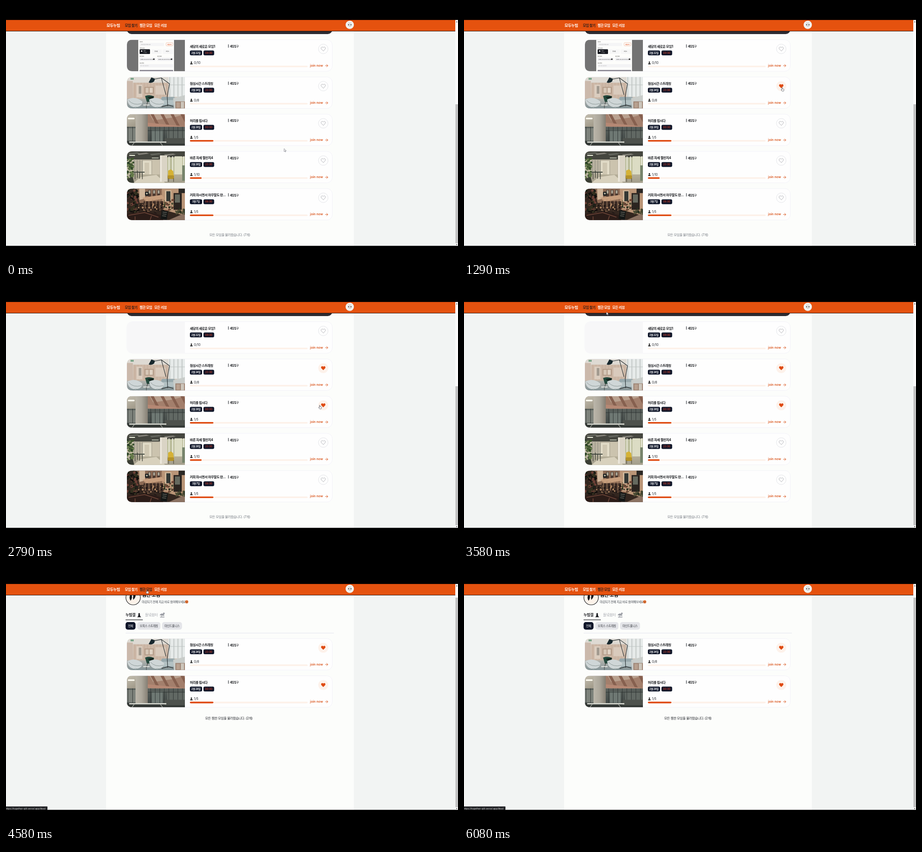
These frames come from a looping animation (998x561 px, 6.75 s). An HTML page:

```html
<!DOCTYPE html>
<html lang="ko">
<head>
<meta charset="utf-8">
<style>
html, body { margin: 0; width: 100%; height: 100%; overflow: hidden; background: #000; }
svg { display: block; width: 100%; height: 100%; }
text { font-family: Inter, "Noto Sans CJK KR", "Noto Sans CJK", sans-serif; white-space: pre; }
.like .full, .like.on .empty { display: none; }
.like.on .full { display: inline; }
</style>
</head>
<body>
<svg id="stage" viewBox="0 0 998 561"></svg>
<script>
const LOOP = 6750;
const ORANGE = '#df4b12', NAVY = '#0f1629';

const rect = (x, y, w, h, fill, r = 0, extra = '') =>
  `<rect x="${x}" y="${y}" width="${w}" height="${h}" rx="${r}" fill="${fill}" ${extra}/>`;
const circle = (x, y, r, fill, extra = '') =>
  `<circle cx="${x}" cy="${y}" r="${r}" fill="${fill}" ${extra}/>`;
const shape = (d, fill) => `<path d="${d}" fill="${fill}"/>`;
const line = (d, stroke, w = 1) =>
  `<path d="${d}" fill="none" stroke="${stroke}" stroke-width="${w}" stroke-linecap="round" stroke-linejoin="round"/>`;
// Hangul is set a little tighter than Latin text.
const text = (x, y, s, size, fill, weight = 400, anchor = 'start', extra = '') => {
  const spacing = /[가-힣]/.test(s) ? -size * 0.05 : 0;
  return `<text x="${x}" y="${y}" font-size="${size}" fill="${fill}" font-weight="${weight}"
    text-anchor="${anchor}" letter-spacing="${spacing}" ${extra}>${s}</text>`;
};
const group = (x, y, content, extra = '') => `<g transform="translate(${x} ${y})" ${extra}>${content}</g>`;
const gradient = (id, x2, y2, ...colors) => `<linearGradient id="${id}" x2="${x2}" y2="${y2}">` +
  colors.map((c, i) => `<stop offset="${i / (colors.length - 1)}" stop-color="${c}"/>`).join('') + '</linearGradient>';

let seed = 7;
const random = () => (seed = seed * 16807 % 2147483647) / 2147483647;
const speckle = (n, x, y, w, h, colors, r) => Array.from({ length: n }, () =>
  circle((x + random() * w).toFixed(1), (y + random() * h).toFixed(1), (r * (0.5 + random())).toFixed(1),
    colors[Math.floor(random() * colors.length)])).join('');
const bars = (from, to, step, y, h, fill, w = 0.7) => {
  let out = '';
  for (let x = from; x <= to; x += step) out += rect(x, y, w, h, fill);
  return out;
};

// Card pictures, each 128 by 70.
const pictures = {
  form: () => rect(0, 0, 128, 70, '#737373') + rect(25, 0, 79, 70, '#fdfdfb') +
    text(28, 5, '이미지', 2.6, '#333') +
    rect(28, 7, 54, 7, '#f5f5f6', 1) + text(31, 11, '이미지를 첨부해주세요', 2.4, '#999') +
    rect(86.5, 6.5, 15, 7, '#fff', 1.5, 'stroke="#e9a27e" stroke-width=".6"') +
    text(94, 11, '파일 찾기', 2.6, ORANGE, 600, 'middle') +
    text(28, 19.5, '선택 서비스', 2.6, '#333') +
    rect(28, 21, 23, 10.5, '#17191f', 1.5) + circle(32.5, 25, 1.5, '#fff') +
    text(36, 25.5, '오피스', 2.4, '#fff') + text(36, 29, '스트레칭', 2.2, '#bbb') +
    rect(54, 21, 23, 10.5, '#f7f7f7', 1.5) + text(61, 26, '들녘쉼', 2.8, '#333') +
    rect(79, 21, 23, 10.5, '#f7f7f7', 1.5) + text(86, 26, '마인드', 2.8, '#333') +
    text(28, 37, '모임 날짜', 2.6, '#333') + text(67, 37, '마감 날짜', 2.6, '#333') +
    [28, 67].map(x => rect(x, 39.5, 35, 7.5, '#f3f3f5', 1) +
      text(x + 2, 44.6, '2025-02-22 07:00 AM', 2.7, '#222') +
      rect(x + 30, 41.6, 3, 3, '#333', 0.4)).join('') +
    text(28, 52, '모집 정원', 2.6, '#333') + rect(28, 54, 74, 7, '#f3f3f5', 1) +
    text(30, 58.5, '최소 5인 이상 입력', 2.4, '#aaa') + rect(28, 66.8, 74, 4, '#898791', 1),

  lounge: () => rect(0, 0, 128, 70, 'url(#plaster)') + shape('M0 0H100L92 12H14L0 7Z', '#dedad3') +
    rect(0, 9, 13, 40, '#cbb9ab') + rect(14, 13, 78, 35, '#cdb8a7') + bars(17, 90, 7, 13, 35, '#bfa794') +
    rect(21, 17, 13, 28, '#dbcdbf') + rect(26, 20, 6, 17, '#a39b90') + rect(39, 22, 20, 15, '#b39b88') +
    rect(41, 24, 7, 11, '#d5c6b6') + rect(50, 24, 7, 11, '#e0d3c4') + rect(63, 19, 22, 20, '#d9cabc') +
    rect(92, 0, 36, 44, '#e6eae9') + bars(94, 127, 9, 0, 44, '#b2b8b7', 1.3) + rect(92, 17, 36, 1, '#bcc2c1') +
    shape('M8 2H15V6H8Z', '#78a287') +
    rect(0, 48, 128, 22, 'url(#carpet)') +
    rect(76, 44, 30, 19, '#97a8ac', 3) + rect(79, 51, 27, 10, '#b3c1c3', 2) +
    shape('M102 47L128 40V70H104Z', '#c9cdca') + rect(107, 54, 21, 16, '#9d8373') +
    rect(109, 56, 8, 12, '#b7a08f') + rect(119, 55, 7, 14, '#ccc5bb') +
    shape('M40 42Q50 38 60 43L57 55H44Z', '#24493d') + shape('M45 45L59 42L57 51Z', '#15241f') +
    line('M46 54L43 64M56 54L60 64', '#332f2c') +
    [[18, 57], [66, 57]].map(([x, y]) => shape(`M${x - 17} ${y - 7}Q${x} ${y - 16} ${x + 16} ${y - 3}Q${x + 16} ${y + 9} ${x} ${y + 10}Q${x - 15} ${y + 9} ${x - 17} ${y - 7}`, '#cfd6d7') +
      line(`M${x - 14} ${y - 5}Q${x - 4} ${y + 7} ${x + 14} ${y + 2}M${x} ${y + 9}L${x - 5} 70M${x + 2} ${y + 9}L${x + 9} 70`, '#7d8987', 0.8)).join('') +
    rect(36, 61, 14, 2, '#e8e8e3') + line('M43 63V70', '#434644') +
    shape('M54 1L62 4L60 10Q53 15 48 12Z', '#17272d') +
    line('M60 5L76 2L94 15L89 43L90 64M76 2L86 39', '#20282b', 1.1) + line('M77 66L91 62L102 65', '#24292a', 1.3),

  beams: () => rect(0, 0, 128, 70, '#8f8878') + shape('M0 0H48L60 28H0Z', 'url(#soffit)') +
    shape('M44 0H128V34L46 24Z', '#a37f6c') + shape('M50 0H128L104 7L58 14Z', '#b9a18f') +
    [52, 74, 96, 118].map(x => shape(`M${x} 0H${x + 7}L${x + 23} 30L${x + 17} 31Z`, '#86604f')).join('') +
    shape('M46 19L128 27V35L46 27Z', '#b58874') + rect(0, 28, 128, 36, 'url(#glass)') +
    rect(0, 31, 20, 28, '#7d827b') + rect(55, 35, 24, 25, '#6e7873') + rect(89, 36, 39, 21, '#616863') +
    bars(2, 128, 10, 28, 36, '#2e3433', 0.9) + rect(45, 36, 83, 0.9, '#2a302f') +
    rect(19, 0, 27, 64, 'url(#column)') +
    rect(2, 8, 15, 3.5, '#fbf9ef', 1.7) + rect(0, 61, 128, 9, '#343936') + rect(83, 53, 45, 12, '#4d514c') +
    rect(5, 60.5, 82, 2.6, '#dddfd6') + line('M16 63L11 70M74 63L79 70', '#b3b6ae', 1.2),

  hall: () => rect(0, 0, 128, 70, '#c7bfa9') + shape('M0 0H128V11L91 18H20L0 17Z', '#45463f') +
    [3, 23, 51, 82].map((x, i) => shape(`M${x} ${4 + i}L${x + 20} ${2 + i}L${x + 26} ${4 + i}L${x + 3} ${7 + i}Z`, i % 2 ? '#85837a' : '#666860')).join('') +
    rect(5, 8, 13, 2, '#f9ffe8', 1) + rect(55, 14, 15, 1.2, '#f9ffe8') +
    rect(14, 18, 60, 34, '#b9b2a0') + rect(34, 21, 20, 30, '#e2dcc8') + rect(39, 25, 10, 26, '#cfc7b2') +
    rect(56, 20, 16, 33, '#cbc3ae') + bars(16, 34, 6, 19, 32, '#85857a', 0.8) +
    rect(89, 13, 39, 47, '#bdbf9f') + bars(92, 127, 8, 11, 48, '#eeeddf', 2) + rect(105, 11, 17, 49, '#dcdcc4') +
    rect(0, 51, 128, 19, 'url(#tiles)') + shape('M30 57L65 52L85 70H14Z', '#d8d1bd') +
    rect(73, 9, 16, 58, '#dad4c5') + rect(73, 9, 4, 58, '#ebe6da') +
    speckle(75, 0, 15, 14, 44, ['#263d25', '#40562f', '#667b4a'], 2) +
    rect(14, 45, 25, 2, '#41483f') + line('M18 48V61M34 48V61M23 43V58M28 47V60', '#3a3c35', 1.3) +
    shape('M0 60L13 57L16 70H0Z', '#3b3f34') +
    shape('M91 43Q97 37 102 44L104 58H91Z', '#d5b235') + rect(90, 53, 14, 8, '#b3922a', 2) +
    line('M92 60V67M103 60V67', '#3e392b') + rect(122, 31, 6, 34, '#77846c'),

  cafe: () => rect(0, 0, 128, 70, '#33261f') + shape('M20 0H78V29L28 32Z', '#8d6b55') +
    shape('M77 0H128V60L78 46Z', '#ba9577') + shape('M27 0H40V22L28 25Z', '#cfb59a') +
    [47, 57, 67].map(x => rect(x, 3, 6, 15, '#4a382f') + rect(x + 1, 4, 4, 7, '#aaa493')).join('') +
    rect(84, 4, 14, 25, '#d2b99b') + rect(87, 6, 9, 22, '#343834') + rect(103, 10, 18, 37, '#2b2420') +
    rect(106, 13, 11, 18, '#66695f') + rect(114, 0, 14, 10, '#2a2724') +
    shape('M34 20L77 14L83 22L43 29Z', '#c79e7d') + rect(37, 28, 43, 18, '#3d2c25') +
    bars(40, 80, 8, 24, 20, '#b08a68', 1.2) + rect(40, 7, 8, 9, '#171c1e', 2) + circle(44, 11, 2, '#b9b19d') +
    speckle(85, 0, 2, 24, 53, ['#120f0d', '#1d2018', '#33301f', '#6d4036'], 2.3) +
    speckle(35, 80, 25, 24, 25, ['#20291a', '#46492f', '#6d4636'], 1.6) +
    speckle(70, 22, 34, 60, 22, ['#17110f', '#5d4536', '#a9805f', '#271d19'], 1.6) +
    shape('M0 56L42 50L80 60V70H0Z', '#2b1c18') + line('M4 59L39 53L69 63M18 62V70M54 61L51 70', '#71483a', 1.6) +
    shape('M77 48L91 50L88 69L74 67Z', '#141716') + line('M79 52L88 53M79 56L87 57M78 60L86 61', '#a6a598', 0.8) +
    shape('M91 70L128 54V70Z', '#8b7262') + speckle(25, 106, 44, 22, 13, ['#29301f', '#4c4c34'], 1.8)
};

const HEART = 'M0 4.5L-4 .5C-6.2-2-3.5-5.4-1-3.9Q-.3-3.4 0-2.8Q.3-3.4 1-3.9C3.5-5.4 6.2-2 4 .5Z';
const person = circle(142.3, 49.5, 1.5, '#111') + shape('M139.5 54.2Q139.7 51.5 142.3 51.5Q145 51.5 145.2 54.2Z', '#111');

function card(top, picture, title, date, time, joined, limit, name) {
  const likeButton =
    `<g class="empty">${circle(0, 0, 10.6, '#fefefe', 'stroke="#dcdde3" stroke-width=".8"')}${line(HEART, '#9c9da4', 0.8)}</g>` +
    `<g class="full">${circle(0, 0, 11, '#fdf2eb')}${shape(HEART, ORANGE)}</g>`;
  return group(267, top,
    rect(0, 0, 453.5, 69.6, '#fefefe', 12, 'stroke="#eeedf6" stroke-width=".7"') +
    `<g clip-path="url(#photo)">${rect(0, 0, 128, 70, '#f7f7f8')}<g class="photo-${name}">${pictures[picture]()}</g></g>` +
    text(139, 17.1, title, 7.2, '#17191d', 700) + rect(223.5, 10.3, 1.2, 7.2, '#30343b') +
    text(227.3, 16.6, '새담입구', 5.5, '#16181c', 600) +
    rect(139, 23.8, 27, 10.8, NAVY, 3) + text(152.4, 31.2, date, 5.5, '#fff', 700, 'middle') +
    rect(169, 23.8, 23.6, 10.8, NAVY, 3) + text(180.8, 31.2, time, 5.5, '#cf3b25', 500, 'middle') +
    person + text(148, 53.9, `${joined}/${limit}`, 7.1, '#202329') +
    rect(139, 57.2, 260, 3.6, '#fdf1e9', 1.8) + (joined ? rect(139, 57.2, 260 * joined / limit, 3.6, ORANGE, 1.8) : '') +
    text(404.3, 59.2, 'join now', 7.1, '#d9541b', 600) +
    line('M438.2 57.3H443.5M440.9 54.5L443.7 57.3L440.9 60.1', '#d9541b', 0.9) +
    group(433.5, 20.3, likeButton, `class="like" id="like-${name}"`));
}

const stretch = ['lounge', '점심시간 스트레칭', '2월 24일', '23:00', 0, 8];
const back = ['beams', '허리를 핍시다', '2월 28일', '00:00', 1, 5];

const searchPage =
  rect(267, 40, 453.5, 22, '#2c2b31', 10) +
  card(74.5, 'form', '새담의 새로운 모임1', '2월 22일', '09:00', 0, 10, 'new') +
  card(156.7, ...stretch, 'stretch') + card(238.8, ...back, 'back') +
  card(321, 'hall', '바른 자세 챌린지4', '2월 28일', '23:00', 1, 10, 'posture') +
  card(403.2, 'cafe', '커피 마시면서 아무말도 안...', '3월 7일', '06:00', 1, 5, 'coffee') +
  text(494, 507.6, '모든 모임을 불러왔습니다. (7개)', 7.2, '#747980', 400, 'middle') +
  rect(992.3, 217, 5.7, 307, '#c1c1c1');

const pill = (x, w, label, fill, color) =>
  rect(x, 115, w, 16.7, fill, 5) + text(x + w / 2, 125.6, label, 6.4, color, 500, 'middle');
const likedPage =
  circle(280.7, 61, 16, '#fcf2e9', 'stroke="#17191f" stroke-width="1.2"') +
  shape('M275 68Q270 60 276 52Q281 60 275 68M281 66Q279 55 285 49Q289 59 281 66', '#17191f') +
  text(300, 59.4, '찜한 모임', 11, '#17191d', 700) +
  text(300, 72.8, '마감되기 전에 지금 바로 참여해보세요', 6.5, '#3f444d') +
  circle(399, 70.3, 3.5, '#ee7936') + line('M396.8 69L398.2 69.6M401.2 69L399.8 69.6M397.7 72.1H400.3', '#5e2818', 0.8) +
  text(264, 102.4, '누빔결', 8.3, '#17191d', 700) +
  circle(294, 96.7, 1.7, '#17191d') +
  shape('M292.5 98H295.5L296.3 102L298.5 104.3H289.7L291.8 102Z', '#17191d') + rect(264, 109.5, 38, 1.2, '#17191d') +
  text(307, 102.4, '들녘쉼터', 8, '#a4a7ae', 500) +
  shape('M339.3 100Q341 95.6 345 96.3Q349 97 349.6 101.3Z', '#9b9ea5') + line('M344.6 98L343.2 104', '#9b9ea5') +
  rect(340, 103, 10, 1.8, '#9b9ea5', 0.8) + circle(348.5, 96, 2, '#9b9ea5') +
  pill(264, 22, '전체', NAVY, '#fff') + pill(290, 51, '오피스 스트레칭', '#e4e5e9', '#30343b') +
  pill(344.6, 44, '마인드풀니스', '#e4e5e9', '#30343b') + rect(264, 138.8, 460, 0.9, '#dfe2ec') +
  card(151.4, ...stretch, 'liked-stretch') + card(233.6, ...back, 'liked-back') +
  text(494.2, 330.3, '모든 찜한 모임을 불러왔습니다. (2개)', 7.2, '#202329', 400, 'middle', 'id="total"') +
  rect(992.3, 61, 5.7, 463, '#c1c1c1');

const header = rect(0, 30.6, 992, 25, '#e5520f') + rect(0, 55, 992, 1, '#2a130b') +
  text(222, 46, '모두누빔', 8.5, '#fff', 900) +
  text(262.5, 45.6, '모임 찾기', 7.5, '#fff', 600, 'start', 'id="nav-search"') +
  text(295, 45.6, '찜한 모임', 7.5, '#fff', 600, 'start', 'id="nav-liked"') +
  text(327.5, 45.6, '모든 리뷰', 7.5, '#fff', 600) +
  circle(759, 41.6, 9.2, '#f1f1ef') + rect(755, 40.5, 3.2, 2, '#444', 1) + rect(760, 40.5, 3.2, 2, '#444', 1) +
  line('M756 37.8H762M757 44.8H761.5', '#999', 0.7);

const pointers =
  '<path id="arrow" d="M0 0V6.4L1.6 5L2.7 7.4L3.8 6.9L2.7 4.6H4.8Z" fill="#fff" stroke="#555761" stroke-width=".6"/>' +
  '<path id="hand" d="M-.6 .2Q0-.7 .6 .2V3L3.4 3.6Q4.3 4 4 5.2L3.3 8H-.3L-2.4 5Q-2.2 4.1-1.3 4.6L-.6 5.2Z" fill="#fff" stroke="#3d3f49" stroke-width=".7"/>';

const gradients =
  gradient('plaster', 0, 1, '#d9d2c9', '#c5b5a6') + gradient('carpet', 0, 1, '#b3b3ad', '#839397') +
  gradient('soffit', 1, 1, '#c3beb0', '#8d8573') + gradient('glass', 0, 1, '#59605c', '#3f4644') +
  gradient('column', 1, 0, '#bbb6aa', '#aca79b', '#857f74') + gradient('tiles', 0, 1, '#b5ae98', '#a29d8b');

const $ = id => document.getElementById(id);
$('stage').innerHTML =
  `<defs>${gradients}<clipPath id="photo"><path d="M12 0H128V69.6H12Q0 69.6 0 57.6V12Q0 0 12 0"/></clipPath></defs>` +
  rect(0, 0, 998, 561, '#000') + rect(0, 31, 998, 499, '#f2f4f3') + rect(221, 31, 547, 499, '#fcfdfb') +
  rect(992, 30.6, 6, 499.4, '#fbfbfb') +
  `<g id="search">${searchPage}</g><g id="liked">${likedPage}</g>` + header +
  shape('M993.5 36L995.2 33.6L996.9 36ZM993.5 526L995.2 528.4L996.9 526Z', '#555') +
  `<g id="status">${rect(-2, 522.3, 93.5, 7.8, '#202124', 1)}${text(-1.5, 528.6, 'https://together-qilt.vercel.app/liked', 5.2, '#e4e4e4')}</g>` +
  `<g id="pointer">${pointers}</g>` + rect(0, 0, 998, 30.6, '#000') + rect(0, 529.7, 998, 32, '#000');

// Pointer path: time, x, y.
const path = [
  [0, 614, 315], [40, 614, 315], [710, 697, 198], [950, 702.5, 180], [1500, 702.5, 180],
  [2040, 701.5, 276], [2170, 702, 269], [2420, 702, 269], [2560, 702, 261], [2780, 702, 261],
  [3100, 430, 203], [3580, 314.5, 53], [3750, 311, 44], [5080, 311, 44],
  [5250, 313, 46], [5460, 359.5, 54], [5920, 515, 50], [6040, 938, 38], [6080, 950, 24]
];
function pointerAt(t) {
  const next = path.findIndex(p => p[0] > t);
  if (next < 0) return path.at(-1).slice(1);
  const [t0, x0, y0] = path[next - 1], [t1, x1, y1] = path[next];
  const k = (t - t0) / (t1 - t0);
  return [x0 + (x1 - x0) * k, y0 + (y1 - y0) * k];
}

const within = (t, from, to) => t >= from && t < to;
const show = (el, visible) => el.setAttribute('display', visible ? 'inline' : 'none');
for (const name of ['liked-stretch', 'liked-back']) $('like-' + name).classList.add('on');

function draw(t) {
  const onLiked = t >= 4000;
  show($('search'), !onLiked);
  show($('liked'), onLiked);
  show($('status'), t >= 3800);
  show(document.querySelector('.photo-new'), t < 1500);
  $('like-stretch').classList.toggle('on', t >= 1100);
  $('like-back').classList.toggle('on', t >= 2650);
  $('nav-search').setAttribute('fill', onLiked ? '#fff' : '#33211d');
  $('nav-liked').setAttribute('fill', onLiked ? '#33211d' : '#fff');
  $('total').setAttribute('x', t < 4620 ? 492 : 494.2);

  const [x, y] = pointerAt(t);
  const hand = within(t, 750, 1600) || within(t, 2480, 2800) || within(t, 3650, 5300);
  $('pointer').setAttribute('transform', `translate(${x} ${y})`);
  show($('pointer'), t < 6080);
  show($('hand'), hand);
  show($('arrow'), !hand);
}

const start = performance.now();
function frame() {
  draw((performance.now() - start) % LOOP);
  requestAnimationFrame(frame);
}
frame();
</script>
</body>
</html>
```
